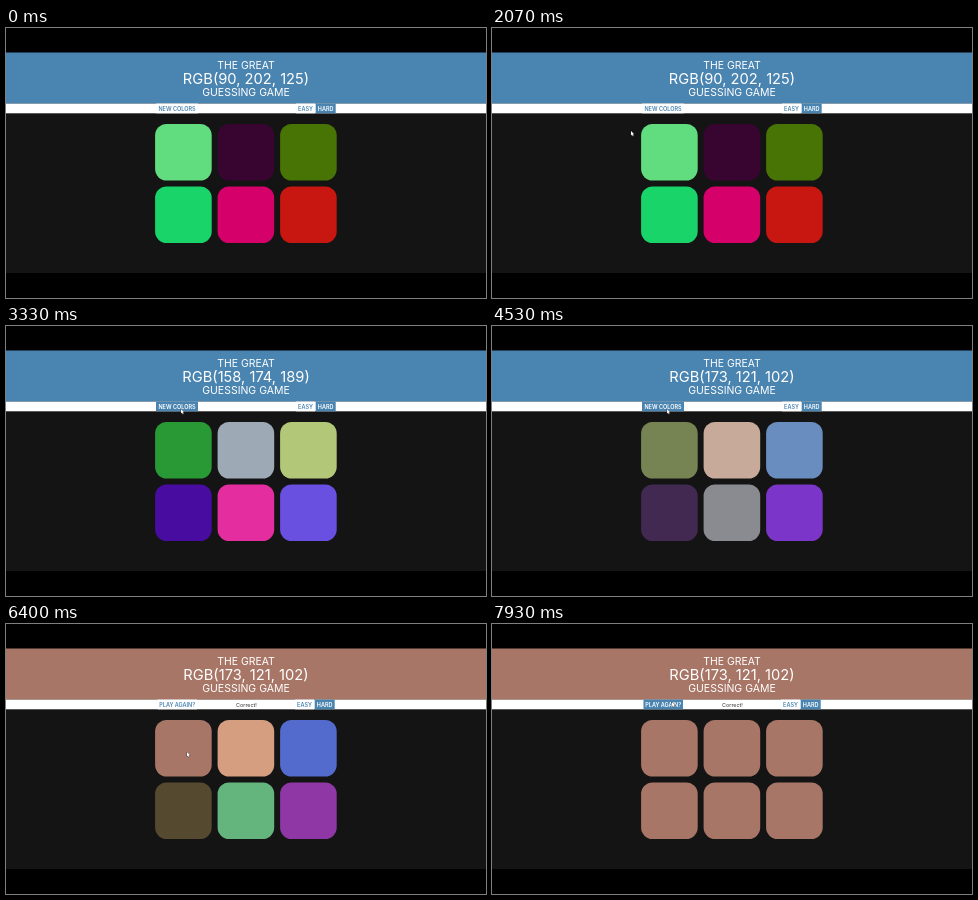
Recreate the animation shown at these times as an HTML page with a canvas. Size 480 by 270 pixels, loop 8 s.

```html
<!DOCTYPE html>
<html lang="en">
<head>
<meta charset="utf-8">
<title>Color guessing game</title>
<style>
html, body { margin: 0; width: 480px; height: 270px; overflow: hidden; background: #000; }
canvas { display: block; width: 480px; height: 270px; }
</style>
</head>
<body>
<canvas id="stage"></canvas>
<script>
const LOOP = 8000;
const FADE = 300;
const WIN = 6350;
const FONT = 'Inter, "Open Sans", sans-serif';

const hex = s => [0, 2, 4].map(i => parseInt(s.slice(i, i + 2), 16));
const BLUE = hex('4a84b0');
const BROWN = hex('a87666');
const WHITE = hex('ffffff');

const round = (at, answer, tiles) => ({
  at,
  title: `RGB(${hex(answer).join(', ')})`,
  tiles: tiles.split(' ').map(hex)
});
const rounds = [
  round(0, '5aca7d', '61dc7e 380530 487305 19d469 d6006a c81610'),
  round(2940, '9eaebd', '289934 9daab6 b2c878 480ca0 e42ea0 6a50e1'),
  round(4425, 'ad7966', 'a87666 e2aa88 3a68ea 3c3c20 50c685 8624b8')
];
rounds.push({ ...rounds[2], at: WIN, tiles: Array(6).fill(BROWN) });

// Pointer moves, each resting until the next one begins
const entry = { at: 70, x: 414, y: 190 };
const moves = [
  { at: 70, end: 470, x: 22, y: 150 },
  { at: 470, end: 1300, x: 196, y: 130 },
  { at: 1300, end: 2000, x: 139, y: 103 },
  { at: 2200, end: 2740, x: 175, y: 83 },
  { at: 5300, end: 6050, x: 181, y: 128 },
  { at: 7150, end: 7700, x: 180, y: 78 }
];

const canvas = document.getElementById('stage');
const ctx = canvas.getContext('2d');
const scale = window.devicePixelRatio || 1;
canvas.width = 480 * scale;
canvas.height = 270 * scale;

const clamp = v => Math.min(1, Math.max(0, v));
const smooth = v => v * v * (3 - 2 * v);
const mix = (a, b, k) => a.map((v, i) => v + (b[i] - v) * k);
const rgb = c => `rgb(${c.map(Math.round).join(',')})`;

// CSS "ease" curve, solved by bisection
function ease(x) {
  const bez = (a, b, u) => 3 * a * u * (1 - u) ** 2 + 3 * b * u * u * (1 - u) + u ** 3;
  let lo = 0, hi = 1;
  for (let i = 0; i < 20; i++) {
    const mid = (lo + hi) / 2;
    if (bez(0.25, 0.25, mid) < x) lo = mid; else hi = mid;
  }
  return bez(0.1, 1, lo);
}

const ramp = (t, start) => ease(clamp((t - start) / FADE));

function rect(x, y, w, h, color) {
  ctx.fillStyle = color;
  ctx.fillRect(x, y, w, h);
}

function text(str, x, y, size, color, weight = 400) {
  ctx.font = `${weight} ${size}px ${FONT}`;
  ctx.textAlign = 'center';
  ctx.fillStyle = color;
  ctx.fillText(str, x, y);
}

function button(label, x, w, fill) {
  rect(x, 75.6, w, 9.7, rgb(mix(WHITE, BLUE, fill)));
  text(label, x + w / 2, 82.6, 5.5, rgb(mix(BLUE, WHITE, fill)), 600);
}

function pointer(t) {
  if (t < entry.at) return;
  let { x, y } = entry;
  for (const m of moves) {
    const k = smooth(clamp((t - m.at) / (m.end - m.at)));
    [x, y] = mix([x, y], [m.x, m.y], k);
  }
  ctx.save();
  ctx.translate(x, y);
  const arrow = new Path2D('M0 0V4.4L1 3.5L1.8 5.2L2.5 4.9L1.8 3.2H3.2Z');
  ctx.lineWidth = 0.6;
  ctx.strokeStyle = '#222';
  ctx.stroke(arrow);
  ctx.fillStyle = '#fff';
  ctx.fill(arrow);
  ctx.restore();
}

function drawTiles(from, to, k) {
  const size = 56.6, pitch = 62.5;
  to.forEach((c, i) => {
    ctx.fillStyle = rgb(mix(from[i], c, k));
    ctx.beginPath();
    ctx.roundRect(149.1 + (i % 3) * pitch, 96 + Math.floor(i / 3) * pitch, size, size, 11.5);
    ctx.fill();
  });
}

function drawHeader(t, title, won) {
  rect(0, 24.5, 480, 51.1, rgb(won ? BROWN : BLUE));
  rect(0, 75.6, 480, 9.7, '#fff');
  text('THE GREAT', 240, 40.6, 10.4, '#fff');
  text(title, 240, 55.9, 14.7, '#fff');
  text('GUESSING GAME', 240, 68.2, 10.5, '#fff');

  if (won) {
    button('PLAY AGAIN?', 151.5, 39.5, ramp(t, 7540));
    text('Correct!', 240.5, 82.6, 5.4, '#333');
  } else {
    button('NEW COLORS', 150, 42, ramp(t, 2620) - ramp(t, 5480));
  }
  const shift = won ? -1 : 0;
  button('EASY', 290 + shift, 19, 0);
  button('HARD', 309.7 + shift, 20, 1);
}

function draw(t) {
  const n = rounds.filter(r => r.at <= t).length - 1;
  const now = rounds[n];
  const before = rounds[Math.max(0, n - 1)];

  ctx.setTransform(scale, 0, 0, scale, 0, 0);
  rect(0, 0, 480, 270, '#000');
  rect(0, 25, 480, 220, '#141414');
  drawHeader(t, now.title, t >= WIN);
  drawTiles(before.tiles, now.tiles, ramp(t, now.at));
  pointer(t);
}

const start = performance.now();
function tick() {
  draw(Math.max(0, performance.now() - start) % LOOP);
  requestAnimationFrame(tick);
}
tick();
</script>
</body>
</html>
```
